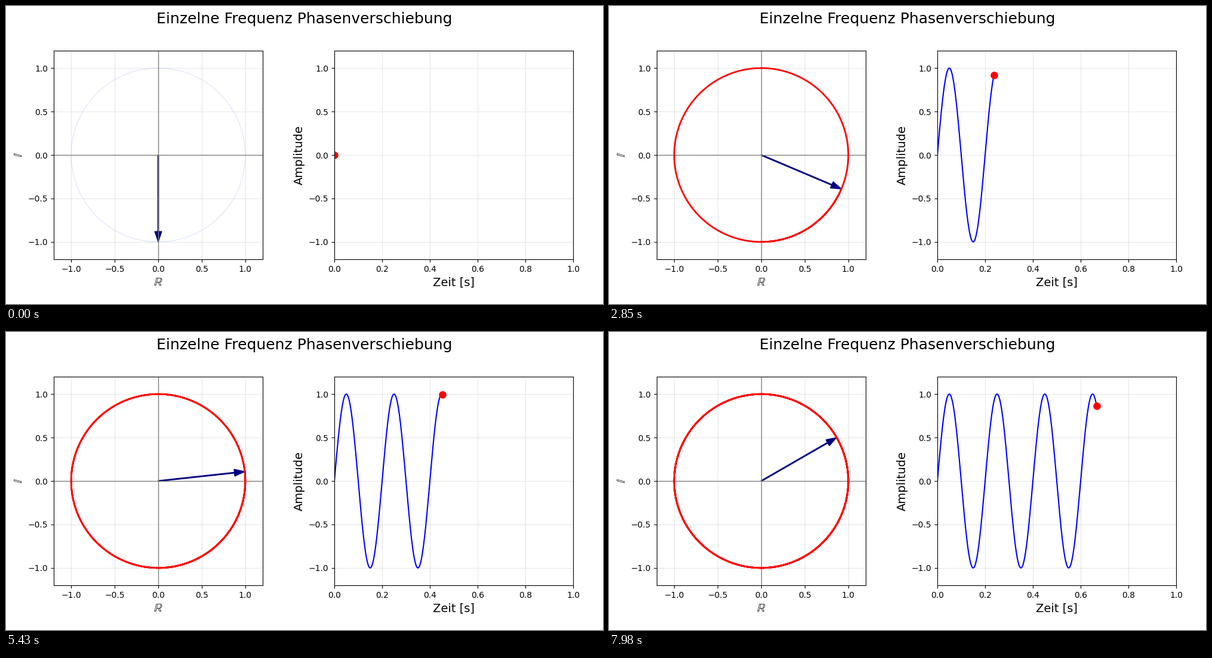
These frames come from a looping animation (1000x500 px, 8000 ms). A matplotlib script:

```python
import numpy as np
import matplotlib.pyplot as plt
from matplotlib.animation import FuncAnimation

LOOP_MS = 8000
FRAMES = 267
SAMPLES = 1000
SWEEP_FRAMES = 400  # frames a full sweep of the time axis would take
FREQ = 5

time = np.linspace(0, 1, SAMPLES)
angle = 2 * np.pi * FREQ * time - np.pi / 2
re, im = np.cos(angle), np.sin(angle)

fig = plt.figure(figsize=(10, 5), dpi=100)
fig.suptitle("Einzelne Frequenz Phasenverschiebung", fontsize=18)


def add_panel(left, width, xlim, xlabel, ylabel):
    ax = fig.add_axes([left, 0.15, width, 0.7])
    ax.set_xlim(*xlim)
    ax.set_ylim(-1.2, 1.2)
    ax.set_xlabel(xlabel, fontsize=14)
    ax.set_ylabel(ylabel, fontsize=14)
    ax.grid(alpha=0.3)
    return ax


plane = add_panel(0.08, 0.35, (-1.2, 1.2), r"$\mathbb{R}$", r"$\mathbb{I}$")
wave = add_panel(0.55, 0.40, (0, 1), "Zeit [s]", "Amplitude")

# Complex plane: axes, unit circle, rotating pointer and its trail
plane.axhline(0, color="gray", lw=1)
plane.axvline(0, color="gray", lw=1)
turn = np.linspace(0, 2 * np.pi, 400)
plane.plot(np.cos(turn), np.sin(turn), color="royalblue", lw=1, alpha=0.15)
trail, = plane.plot([], [], color="red", lw=2)
pointer = plane.arrow(0, 0, 0, -1, width=0.01, head_width=0.08,
                      head_length=0.12, length_includes_head=True,
                      color="navy")

# Signal over time: the real part of the pointer
signal, = wave.plot([], [], color="blue", lw=1.5)
dot, = wave.plot([], [], "o", color="red", ms=8)


def update(frame):
    i = frame * (SAMPLES - 1) // (SWEEP_FRAMES - 1)
    pointer.set_data(dx=re[i], dy=im[i])
    trail.set_data(re[:i + 1], im[:i + 1])
    signal.set_data(time[:i + 1], re[:i + 1])
    dot.set_data([time[i]], [re[i]])
    return pointer, trail, signal, dot


anim = FuncAnimation(fig, update, frames=FRAMES, interval=LOOP_MS / FRAMES,
                     repeat=True, repeat_delay=0)
plt.show()
```
